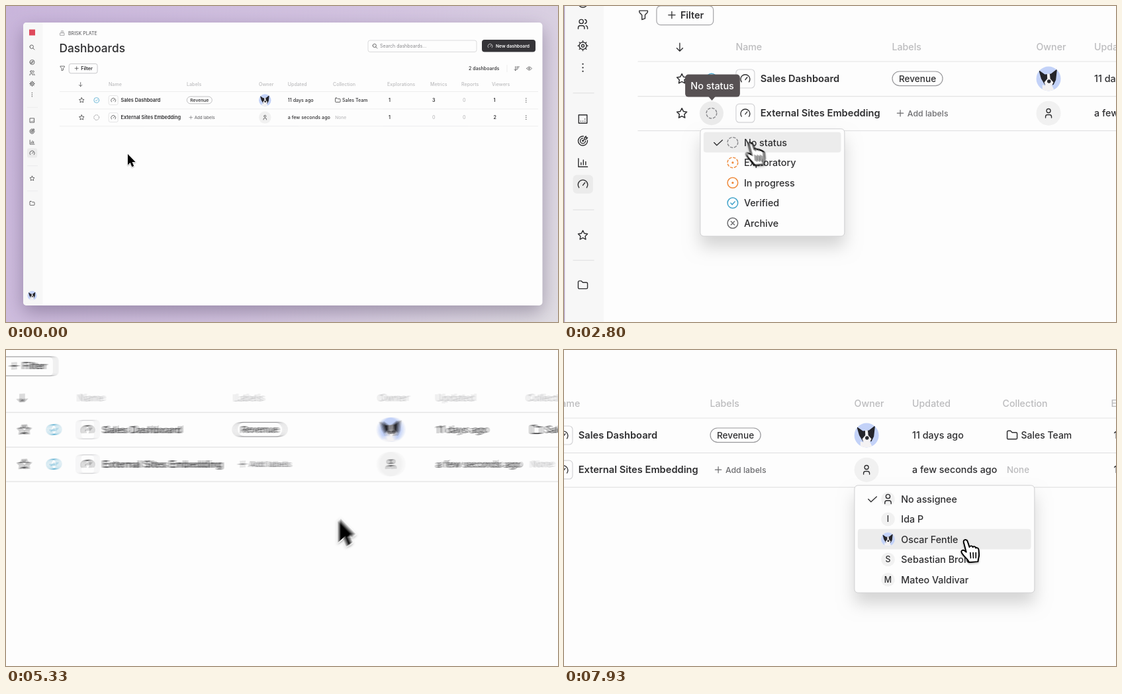
Animation of 834 by 478 pixels, one loop 8000 ms. Source, as an HTML page with a canvas:

```html
<!DOCTYPE html>
<html lang="en">
<head>
<meta charset="utf-8">
<title>Dashboards</title>
<style>
html, body { margin: 0; width: 100%; height: 100%; overflow: hidden; background: #fdfdfd; }
canvas { display: block; width: 834px; height: 478px; }
</style>
</head>
<body>
<canvas id="stage" width="834" height="478"></canvas>
<script>
const W = 834, H = 478, LOOP = 8000, SHUTTER = 16, SAMPLES = 7;
const INK = '#2f2f31', GREY = '#bcbcbe', LINE = '#e3e3e4', BLUE = '#45a5cc', ORANGE = '#ef8a3c';
const ROW1 = 142.5, ROW2 = 168.6, ITEM_TOP = 182.9, ITEM_H = 15.25;
const STATUS_OPEN = 1080, STATUS_PICK = 4150, OWNER_OPEN = 6105, TIP_AT = 2600;
const CLICKS = [STATUS_OPEN, STATUS_PICK, OWNER_OPEN];

const stage = document.getElementById('stage').getContext('2d');
const buffer = document.createElement('canvas');
buffer.width = W;
buffer.height = H;
const c = buffer.getContext('2d');

// Icons live in a 24 unit box.
const ICONS = {
  search: 'M3 10a7 7 0 1 0 14 0a7 7 0 1 0-14 0M21 21l-6-6',
  compass: 'M3 12a9 9 0 1 0 18 0a9 9 0 1 0-18 0M8 16l2-6 6-2-2 6z',
  users: 'M5 7a4 4 0 1 0 8 0a4 4 0 1 0-8 0M3 21v-2a4 4 0 0 1 4-4h4a4 4 0 0 1 4 4v2M16 3.1a4 4 0 0 1 0 7.8M21 21v-2a4 4 0 0 0-3-3.9',
  gear: 'M5 12a7 7 0 1 0 14 0a7 7 0 1 0-14 0M9.5 12a2.5 2.5 0 1 0 5 0a2.5 2.5 0 1 0-5 0M12 2.5V5M12 19v2.5M2.5 12H5M19 12h2.5M5.3 5.3L7 7M17 17l1.7 1.7M5.3 18.7L7 17M17 7l1.7-1.7',
  dots: 'M11.5 5h1v.6h-1zM11.5 12h1v.6h-1zM11.5 19h1v.6h-1z',
  grid: 'M4 4h16v16H4zM8 16h.1M12 16h.1M16 16h.1M16 12h.1',
  target: 'M11 12a1 1 0 1 0 2 0a1 1 0 1 0-2 0M12 7a5 5 0 1 0 5 5M13 3.1a9 9 0 1 0 7.9 7.9M15 6v3h3l3-3h-3V3zM15 9l-3 3',
  bars: 'M3.5 4v16H21M8.5 16v-4M13 16V7M17.5 16v-6',
  gauge: 'M4.5 18.5a9.3 9.3 0 1 1 15 0M12 14l4-5',
  star: 'M12 3l2.8 5.7 6.2.9-4.5 4.4 1.1 6.2-5.6-2.9-5.6 2.9 1.1-6.2L3 9.6l6.2-.9z',
  folder: 'M5 4h4l3 3h7a2 2 0 0 1 2 2v8a2 2 0 0 1-2 2H5a2 2 0 0 1-2-2V6a2 2 0 0 1 2-2z',
  user: 'M8 7a4 4 0 1 0 8 0a4 4 0 1 0-8 0M6 21v-2a4 4 0 0 1 4-4h4a4 4 0 0 1 4 4v2',
  check: 'M4 12l5.5 5.5L21 7',
  plus: 'M12 5v14M5 12h14',
  down: 'M12 4v16M18 14l-6 6-6-6',
  funnel: 'M4 4h16v2.2a2 2 0 0 1-.6 1.4L15 12v7l-6 2v-8.5L4.5 7.6A2 2 0 0 1 4 6.2z',
  sort: 'M6 4v16M2 16l4 4 4-4M11 5h10M11 10h7M11 15h3',
  eye: 'M2 12q10-14 20 0q-10 14-20 0M9.5 12a2.5 2.5 0 1 0 5 0a2.5 2.5 0 1 0-5 0',
  stack: 'M8 3h8M6 8h12M4 12h16v9H4z'
};
for (const k in ICONS) ICONS[k] = new Path2D(ICONS[k]);

const ARROW = new Path2D('M0 0V16.4L3.7 13L6.3 19.2L9.2 18L6.6 11.9H11.6Z');
const HAND = new Path2D('M-1.3 1.2C-1.6-.7 1-.9 1.5.8L3 5.2C3.6 3.9 5.2 4 5.5 5.2C6.2 4.4 7.6 4.7 7.8 5.9C8.6 5.3 9.8 5.9 9.9 7L10.2 10.5C10.3 12.5 9.5 13.5 9.4 16L2.8 16.5C2.2 14-.8 12.8-2.6 9.6C-3.8 7.6-1.8 6.6.2 8.6L.7 8.9Z');
const HAND_LINES = new Path2D('M3.7 9.3L4 13.3M5.8 9.3L6 13.3M7.9 9.3V13.3');

const STATUSES = ['No status', 'Exploratory', 'In progress', 'Verified', 'Archive'];
const PEOPLE = ['No assignee', 'Ida P', 'Oscar Fentle', 'Sebastian Brole', 'Mateo Valdivar'];
const STATUS_MENU = { x: 128.2, w: 109, text: 33, icon: 24.5 };
const OWNER_MENU = { x: 382.2, w: 136, text: 35.2, icon: 25.3 };

const clamp = v => Math.max(0, Math.min(1, v));
const ease = v => { v = clamp(v); return v * v * (3 - 2 * v); };
const spring = ms => {
  const a = 5.9 * Math.max(0, ms) / 1000;
  return 1 - (1 + a) * Math.exp(-a);
};

function camera(t) {
  const zoom = spring(t - 855), pan = spring(t - 5020);
  return { s: 1 + zoom, x: -50.5 * zoom - 275 * pan, y: -175 * zoom + 19 * pan };
}

// Each move: start, end, then start point, control point and end point of a curve.
const MOVES = [
  [250, 950, 184, 224, 164, 196, 139, 177],
  [2450, 3450, 139.2, 177.4, 190, 200, 220.3, 237.5],
  [5000, 5650, 220.3, 237.5, 394, 217.5, 391.2, 174],
  [6750, 7800, 391.2, 174, 420, 206, 466, 222]
];
function pointer(t) {
  let m = MOVES[0];
  for (const move of MOVES) if (t >= move[0]) m = move;
  const u = ease((t - m[0]) / (m[1] - m[0])), v = 1 - u;
  const at = i => v * v * m[i] + 2 * u * v * m[i + 2] + u * u * m[i + 4];
  return { x: at(2), y: at(3) };
}

// The pointer shrinks a little around each click.
function pressScale(t) {
  const press = Math.max(...CLICKS.map(at => clamp(1 - Math.abs(t - at) / 150)));
  return 1 - 0.11 * press;
}

function text(str, x, y, size, weight = 500, color = INK, align = 'left') {
  c.font = `${weight} ${size}px Inter, sans-serif`;
  c.textAlign = align;
  c.fillStyle = color;
  c.fillText(str, x, y + size * 0.36);
}
function box(x, y, w, h, r, fill, stroke, lw = 0.5) {
  c.beginPath();
  c.roundRect(x, y, w, h, r);
  if (fill) { c.fillStyle = fill; c.fill(); }
  if (stroke) { c.strokeStyle = stroke; c.lineWidth = lw; c.stroke(); }
}
function disc(x, y, r, fill) {
  c.beginPath();
  c.arc(x, y, r, 0, 7);
  c.fillStyle = fill;
  c.fill();
}
function rule(x1, y1, x2, y2) {
  c.beginPath();
  c.moveTo(x1, y1);
  c.lineTo(x2, y2);
  c.strokeStyle = LINE;
  c.lineWidth = 0.6;
  c.stroke();
}
function icon(name, x, y, size = 9.4, color = INK, lw = 1.8) {
  c.save();
  c.translate(x, y);
  c.scale(size / 24, size / 24);
  c.translate(-12, -12);
  c.strokeStyle = color;
  c.lineWidth = lw;
  c.lineCap = c.lineJoin = 'round';
  c.stroke(ICONS[name]);
  c.restore();
}
function shadow(blur, dy, color) {
  const s = c.getTransform().a;
  c.shadowBlur = blur * s;
  c.shadowOffsetY = dy * s;
  c.shadowColor = color;
}

function shape(fill, points) {
  c.beginPath();
  points.forEach(([x, y]) => c.lineTo(x, y));
  c.closePath();
  c.fillStyle = fill;
  c.fill();
}
function avatar(x, y, r) {
  c.save();
  c.translate(x, y);
  c.scale(r / 10, r / 10);
  disc(0, 0, 10, '#c3d2f8');
  c.clip();
  shape('#25252b', [[-8, -7], [-3, -3.5], [2, -4], [7, -8], [6, 1], [4, 5], [-3, 5], [-6, 0]]);
  shape('#f4f2f3', [[-1.2, -4], [1, -4], [1.4, 0], [4, 3], [2, 7], [-2, 7], [-3.5, 3], [-1, 0]]);
  shape('#f4f2f3', [[-5, 5], [-2, 6], [3, 6], [5, 10], [-5, 10]]);
  disc(0.4, 2.2, 1.5, '#2b2b30');
  c.restore();
}

function status(kind, x, y) {
  const color = ['#8b8b8e', ORANGE, ORANGE, BLUE, '#6d6d70'][kind];
  c.save();
  c.strokeStyle = color;
  c.lineWidth = 0.75;
  c.lineCap = 'round';
  if (kind < 2) c.setLineDash([1.6, 1.52]);
  c.beginPath();
  c.arc(x, y, 3.9, 0, Math.PI * 2);
  c.stroke();
  c.setLineDash([]);
  if (kind === 1 || kind === 2) disc(x, y, 0.8, color);
  c.beginPath();
  if (kind === 3) {
    c.moveTo(x - 1.5, y + 0.1);
    c.lineTo(x - 0.4, y + 1.2);
    c.lineTo(x + 1.6, y - 1);
  } else if (kind === 4) {
    c.moveTo(x - 1.3, y - 1.3); c.lineTo(x + 1.3, y + 1.3);
    c.moveTo(x + 1.3, y - 1.3); c.lineTo(x - 1.3, y + 1.3);
  }
  c.stroke();
  c.restore();
}

function drawWindow() {
  const bg = c.createLinearGradient(0, 0, W, H);
  bg.addColorStop(0, '#c9b5db');
  bg.addColorStop(0.55, '#d3c4e0');
  bg.addColorStop(1, '#e0dde3');
  c.fillStyle = bg;
  c.fillRect(0, 0, W, H);
  c.save();
  shadow(28, 10, 'rgba(50,35,70,.36)');
  box(26, 25, 784.5, 428, 5, '#fdfdfd');
  c.restore();
  box(26, 25, 29.3, 428, [5, 0, 0, 5], '#f7f7f7');
}

function drawSidebar() {
  const x = 39.5;
  box(35, 35.5, 9, 9, 0, '#df4a5c');
  box(32, 215.2, 15.2, 14.2, 3, '#ebebeb');
  const items = { search: 62.5, compass: 85, users: 101.2, gear: 117.6, dots: 134, grid: 173,
    target: 189.5, bars: 206, gauge: 222.3, star: 260.8, folder: 298.6 };
  for (const k in items) icon(k, x, items[k]);
  for (const y of [153.3, 241.7, 279.8]) rule(32, y, 48, y);
  avatar(x, 438, 7);
}

function drawHeader() {
  icon('stack', 85, 41, 9, '#77777a', 1.6);
  text('BRISK PLATE', 94, 41, 7, 500, '#68686b');
  text('Dashboards', 80.5, 63.5, 17.3, 500);
  box(547, 52, 164, 17.5, 3, '#fdfdfd', '#d2d2d4', 0.8);
  icon('search', 557.5, 60.7, 9);
  text('Search dashboards...', 565, 60.7, 7, 400, '#88888b');
  box(719, 51, 81, 18.6, 4, '#353438');
  icon('gauge', 731.5, 60.5, 9, '#fff');
  text('New dashboard', 740, 60.5, 6.7, 600, '#fff');
  icon('funnel', 85.3, 94.2);
  box(95.2, 87.4, 42.9, 14.4, 3, '#fdfdfd', '#a5a5a8', 0.6);
  icon('plus', 106.7, 94.3, 8.8);
  text('Filter', 113.2, 94.3, 7.2, 600);
  text('2 dashboards', 699, 94.5, 7.1);
  rule(757, 89, 757, 100);
  icon('sort', 772, 94.5, 9);
  icon('eye', 790.5, 94.5, 9);
}

function drawRow(y, name, counts, seen) {
  icon('star', 114.3, y, 10);
  box(155.2, y - 7, 14, 14, 2.5, '#fdfdfd', '#d3d3d6', 0.6);
  icon('gauge', 162.2, y, 9);
  text(name, 173.6, y, 7.33, 600);
  text(seen, 425.8, y, 7.15);
  [578, 644, 690, 736.5].forEach((x, i) => {
    const n = counts[i];
    text(n, x, y, 7, n ? 600 : 500, n ? INK : GREY);
  });
  icon('dots', 786, y);
}

function drawTable(t, hoverRow, menuOpen) {
  const heads = { Name: 155, Labels: 273, Owner: 382, Updated: 425.8, Collection: 494, Explorations: 576,
    Metrics: 641, Reports: 688, Viewers: 734 };
  if (hoverRow) box(81, 155.8, 723, 26, 0, '#f4f4f4');
  icon('down', 112.7, 118.6, 9);
  for (const k in heads) text(k, heads[k], 118.5, 7.1, 500, GREY);
  for (const y of [129.5, 155.8, 181.8]) rule(81, y, 804, y);

  drawRow(ROW1, 'Sales Dashboard', [1, 3, 0, 1], '11 days ago');
  status(3, 136.7, ROW1);
  box(273.3, 137, 38, 10.8, 5.4, null, '#98989b', 0.6);
  text('Revenue', 292.3, ROW1, 6.8, 500, INK, 'center');
  avatar(391.3, ROW1, 9.25);
  icon('folder', 501.3, ROW1, 10);
  text('Sales Team', 508, ROW1, 7);

  drawRow(ROW2, 'External Sites Embedding', [1, 0, 0, 2], 'a few seconds ago');
  if (menuOpen || (hoverRow && t < STATUS_PICK)) disc(136.7, ROW2, 9, '#ebebeb');
  status(t < STATUS_PICK ? 0 : 3, 136.7, ROW2);
  icon('plus', 279.3, ROW2, 8, '#6a6a6d');
  text('Add labels', 284.7, ROW2, 6.15, 500, '#6f6f72');
  disc(391.3, ROW2, 9.25, '#f1f1f1');
  icon('user', 391.3, ROW2, 9);
  text('None', 497.2, ROW2, 6.7, 500, GREY);
}

function drawMenu(menu, labels, alpha, hover, drawIcon) {
  if (alpha <= 0) return;
  const { x, w } = menu, mid = x + w / 2, k = 0.94 + 0.06 * alpha;
  c.save();
  c.globalAlpha = alpha;
  c.translate(mid, 180.4);
  c.scale(k, k);
  c.translate(-mid, -180.4);
  c.save();
  shadow(12, 8, 'rgba(0,0,0,.16)');
  box(x, 180.4, w, 81.2, 2.6, '#fdfdfd');
  c.restore();
  box(x, 180.4, w, 81.2, 2.6, null, '#cfcfd1', 0.5);
  if (hover >= 0) box(x + 2.5, ITEM_TOP + hover * ITEM_H, w - 5.2, 15.3, 2, '#ececec');
  icon('check', x + 13.4, 190.8, 9);
  labels.forEach((label, i) => {
    const y = 190.7 + i * ITEM_H;
    drawIcon(i, x + menu.icon, y);
    text(label, x + menu.text, y, 7.15, 450);
  });
  c.restore();
}
function personIcon(t) {
  return (i, x, y) => {
    if (i === 2 && t > 6300) return avatar(x, y, 5.2);
    disc(x, y, 5.2, '#f1f1f1');
    if (i) text(PEOPLE[i][0], x, y, 6.2, 500, INK, 'center');
    else icon('user', x, y, 9.4);
  };
}

function drawTip() {
  box(116.8, 139.3, 41.4, 17, 2.4, '#575153');
  shape('#575153', [[134.4, 156], [139.6, 156], [137, 159]]);
  text('No status', 137.3, 147.9, 7.2, 500, '#fff', 'center');
}

function drawPointer(p, hand, size) {
  c.save();
  c.translate(p.x, p.y);
  c.scale(size, size);
  c.lineJoin = c.lineCap = 'round';
  shadow(1.5, 0.7, 'rgba(0,0,0,.35)');
  c.strokeStyle = hand ? '#000' : '#fff';
  c.fillStyle = hand ? '#fff' : '#000';
  c.lineWidth = hand ? 1.1 : 1.7;
  const body = hand ? HAND : ARROW;
  c.stroke(body);
  c.shadowColor = 'transparent';
  c.fill(body);
  if (hand) {
    c.lineWidth = 0.8;
    c.stroke(body);
    c.stroke(HAND_LINES);
  }
  c.restore();
}

function drawScene(t) {
  const cam = camera(t), p = pointer(t);
  const statusAlpha = t < STATUS_PICK ? clamp((t - STATUS_OPEN) / 170) : 1 - clamp((t - STATUS_PICK) / 120);
  const ownerAlpha = clamp((t - OWNER_OPEN) / 170);
  const blocked = (t > STATUS_OPEN + 100 && t < STATUS_PICK) || t > OWNER_OPEN + 100;
  const hoverRow = !blocked && p.y > 155.8 && p.y < 181.8;
  const hoverItem = menu => {
    const inside = p.x > menu.x && p.x < menu.x + menu.w;
    const i = Math.floor((p.y - ITEM_TOP) / ITEM_H);
    return inside && i >= 0 && i < 5 ? i : -1;
  };
  const statusHover = statusAlpha > 0 ? hoverItem(STATUS_MENU) : -1;
  const ownerHover = ownerAlpha > 0 ? hoverItem(OWNER_MENU) : -1;
  const onButton = hoverRow && [136.7, 391.3].some(x => Math.abs(p.x - x) < 9);

  c.setTransform(1, 0, 0, 1, 0, 0);
  c.clearRect(0, 0, W, H);
  c.setTransform(cam.s, 0, 0, cam.s, cam.x, cam.y);
  drawWindow();
  drawSidebar();
  drawHeader();
  drawTable(t, hoverRow, t > STATUS_OPEN && t < STATUS_PICK);
  drawMenu(STATUS_MENU, STATUSES, statusAlpha, statusHover, status);
  drawMenu(OWNER_MENU, PEOPLE, ownerAlpha, ownerHover, personIcon(t));
  if (t > TIP_AT && t < STATUS_PICK) drawTip();
  drawPointer(p, onButton || statusHover >= 0 || ownerHover >= 0, pressScale(t));
}

function isMoving(t) {
  const a = camera(t), b = camera(t + SHUTTER), p = pointer(t), q = pointer(t + SHUTTER);
  const shift = Math.abs(a.x - b.x) + Math.abs(a.s - b.s) * 400;
  return shift + Math.hypot(p.x - q.x, p.y - q.y) > 0.6;
}

// Motion blur: average several instants within the shutter time.
function render(t) {
  const n = isMoving(t) ? SAMPLES : 1;
  for (let i = 0; i < n; i++) {
    const at = n > 1 ? t + (i / (n - 1) - 0.5) * SHUTTER : t;
    drawScene(Math.max(0, Math.min(LOOP, at)));
    stage.globalAlpha = 1 / (i + 1);
    stage.drawImage(buffer, 0, 0);
  }
}

const start = performance.now();
function tick() {
  render((performance.now() - start) % LOOP);
  requestAnimationFrame(tick);
}
tick();
</script>
</body>
</html>
```
